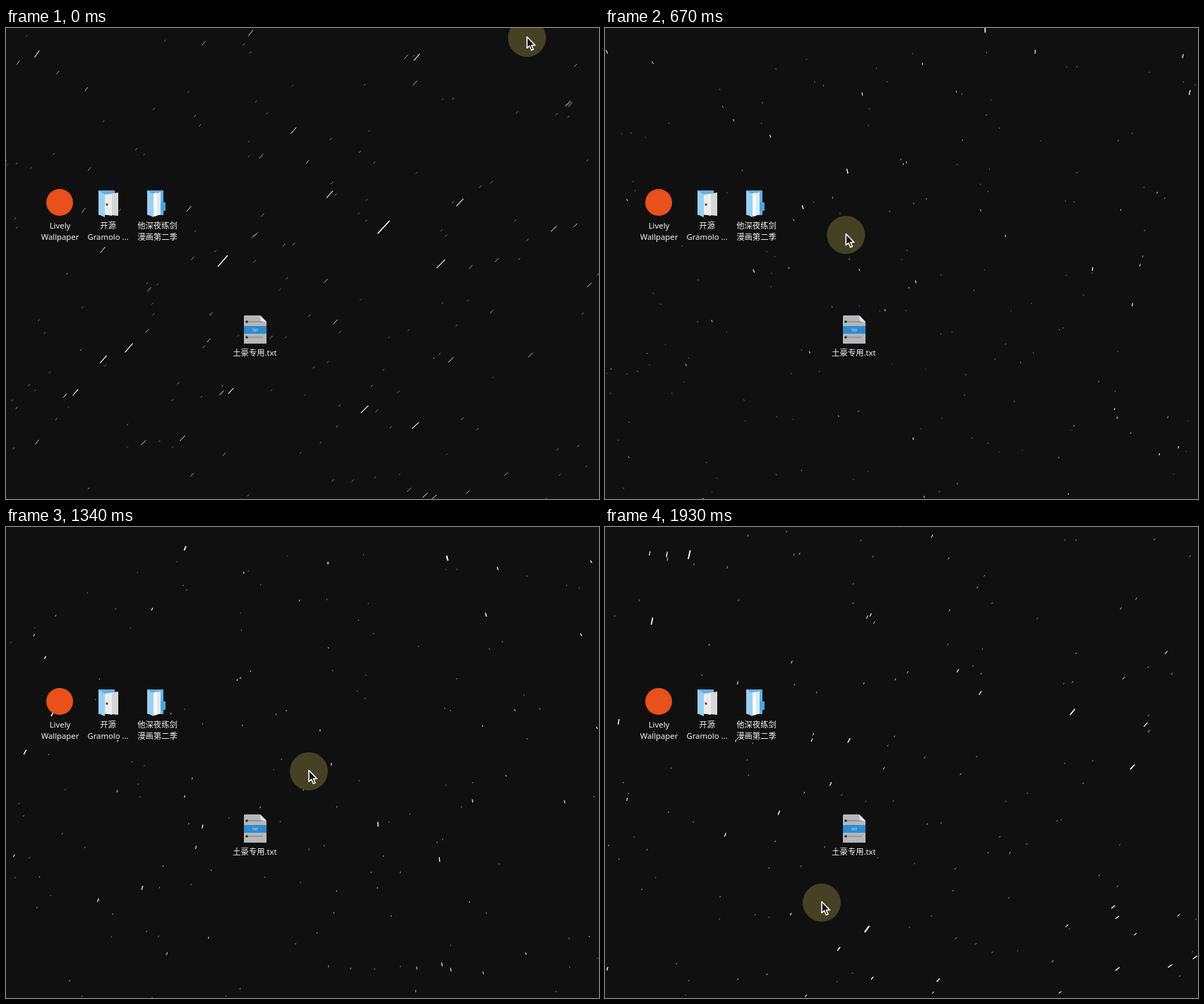
Animation, 840 px wide and 667 px high, one loop 2060 ms. Source, as an HTML page with a canvas:

```html
<!DOCTYPE html>
<html lang="zh">
<head>
<meta charset="utf-8">
<style>
html, body { margin: 0; width: 840px; height: 667px; overflow: hidden; background: #101010; }
canvas { display: block; }
</style>
</head>
<body>
<canvas id="stage" width="840" height="667"></canvas>
<script>
const W = 840, H = 667, LOOP = 2060, STEP = 10, MARGIN = 60;
const ZOOM = 0.0003, GROWTH = 0.00033; // per ms
const g = document.getElementById('stage').getContext('2d');

// the picture holds for short or long beats
const holds = [0];
for (const beat of 'SLLLSSLSSSLSLSLLLLS') holds.push(holds.at(-1) + (beat === 'S' ? 70 : 130));

// time, pointer x y, star drift x y, drift velocity x y
const keys = [
  [0, 738, 14, 0, 0, .75, -.82],
  [330, 492, 195, 201, -225, .5, -.6],
  [530, 367, 267, 252, -310, .13, -.32],
  [870, 291, 378, 189, -365, -.3, 0],
  [1340, 429, 346, 9, -244, 0, .25],
  [1600, 511, 130, -4, -247, -.08, -.25],
  [1930, 307, 532, 113, -404, .15, -.27]
];

function slope(i, col) {
  const a = keys[Math.max(i - 1, 0)], b = keys[Math.min(i + 1, keys.length - 1)];
  return (b[col] - a[col]) / (b[0] - a[0]);
}

// cubic Hermite curve through one column of the keys
function curve(t, col) {
  const last = keys.at(-1);
  if (t >= last[0]) return last[col];
  const i = keys.findIndex(k => k[0] > t) - 1;
  const a = keys[i], b = keys[i + 1], d = b[0] - a[0], u = (t - a[0]) / d;
  const va = col > 2 ? a[col + 2] : slope(i, col);
  const vb = col > 2 ? b[col + 2] : slope(i + 1, col);
  const s = u * u * (3 - 2 * u);
  return a[col] + (b[col] - a[col]) * s + d * u * (1 - u) * (va * (1 - u) - vb * u);
}

// star drift per time step
const drift = [];
for (let t = 0; t <= LOOP; t += STEP) {
  drift.push([3, 4].map(col => curve(t + STEP, col) - curve(t, col)));
}

let seed = 20;
function random() {
  seed = (seed * 16807) % 2147483647;
  return seed / 2147483647;
}

// x, y, depth: the nearest stars, then a random field
const stars = [
  [535, 282, .95], [307, 330, .83], [616, 334, .63], [174, 453, .69],
  [138, 469, .605], [508, 540, .585], [580, 563, .515], [643, 247, .52]
];
while (stars.length < 260) {
  stars.push([
    random() * (W + 2 * MARGIN) - MARGIN,
    random() * (H + 2 * MARGIN) - MARGIN,
    .11 + .4 * random() ** 4
  ]);
}

function wrap(v, size) {
  const span = size + 2 * MARGIN;
  return ((v + MARGIN) % span + span) % span - MARGIN;
}

function drawStar([x, y, z], t) {
  const move = ([dx, dy]) => [
    z * (dx + (x - W / 2) * ZOOM * STEP),
    z * (dy + (y - H / 2) * ZOOM * STEP)
  ];
  const n = Math.round(t / STEP);
  for (let i = 0; i < n; i++) {
    const [dx, dy] = move(drift[i]);
    x = wrap(x + dx, W);
    y = wrap(y + dy, H);
    z *= 1 + GROWTH * STEP;
  }
  let [tx, ty] = move(drift[Math.max(n - 1, 0)]).map(v => v * 1.1);
  if (Math.hypot(tx, ty) < .3) tx = ty = .25;
  g.lineWidth = .55 + z;
  g.globalAlpha = Math.min(1, .35 + .3 * random() + 1.1 * z);
  g.beginPath();
  g.moveTo(x - tx, y - ty);
  g.lineTo(x + tx, y + ty);
  g.stroke();
}

function shape(color, ...p) {
  g.fillStyle = color;
  g.beginPath();
  for (let i = 0; i < p.length; i += 2) g.lineTo(p[i], p[i + 1]);
  g.closePath();
  g.fill();
}

function box(color, x, y, w, h) {
  g.fillStyle = color;
  g.fillRect(x, y, w, h);
}

function disc(color, x, y, r) {
  g.fillStyle = color;
  g.beginPath();
  g.arc(x, y, r, 0, 7);
  g.fill();
}

function label(x, y, ...lines) {
  g.font = '11.3px "Noto Sans", "Noto Sans CJK SC", "Noto Sans CJK", sans-serif';
  g.textAlign = 'center';
  g.fillStyle = '#f4f4f4';
  lines.forEach((line, i) => g.fillText(line, x, y + 16 * i));
}

// blue back and cover; the pages go between
function folder(x, pages) {
  box('#5db0e6', x, 230, 23, 35);
  pages();
  shape('#9bd0f2', x, 230, x + 9, 236, x + 9, 268, x, 264);
}

function drawIcons() {
  disc('#e8501c', 76, 247, 19);
  label(76.5, 284, 'Lively', 'Wallpaper');

  folder(131, () => {
    shape('#d6d6d6', 138, 236, 159, 233, 159, 266, 138, 264);
    shape('#ececec', 140, 237, 150, 235, 150, 266, 140, 264);
  });
  disc('#5a4640', 143, 250, 1.7);
  label(144.5, 284, '开源', 'Gramolo ...');

  folder(200, () => {
    box('#4ba3dd', 219, 247, 7, 12);
    shape('#dfeaf1', 210, 236, 219, 232, 219, 264, 210, 267);
    shape('#f6fafc', 207, 235, 214, 233, 214, 266, 207, 267);
  });
  label(214.5, 284, '他深夜练剑', '漫画第二季');

  shape('#b5b7b9', 338, 407, 360, 407, 369, 416, 369, 447, 337, 447, 337, 408);
  shape('#e6e8ea', 360, 407, 369, 416, 361, 416);
  for (const y of [416, 438]) {
    box('#77797b', 341, y - .5, 23, 1);
    disc('#222', 341, y, 1.7);
  }
  box('#2f8ccf', 337, 422, 32, 11);
  label(352.5, 464, '土豪专用.txt');
  g.font = '5px "Noto Sans", sans-serif';
  g.fillText('TXT', 353, 429.5);
}

function drawPointer(t) {
  const x = curve(t, 1), y = curve(t, 2);
  disc('rgba(255,235,110,.22)', x, y, 27);
  g.save();
  g.translate(x, y - 1.5);
  shape('#151515', 0, 0, 0, 16, 3.6, 12.8, 6.3, 19, 9, 17.8, 6.5, 12, 11.5, 12);
  g.lineWidth = 1.6;
  g.lineJoin = 'round';
  g.stroke();
  g.restore();
}

function draw(t) {
  seed = 77;
  g.globalAlpha = 1;
  box('#101010', 0, 0, W, H);
  g.strokeStyle = '#fff';
  g.lineCap = 'round';
  stars.forEach(s => drawStar(s, t));
  g.globalAlpha = 1;
  drawIcons();
  drawPointer(t);
}

let shown = -1;
function tick() {
  const now = performance.now() % LOOP;
  const t = holds.filter(h => h <= now).pop();
  if (t !== shown) draw(shown = t);
  requestAnimationFrame(tick);
}
tick();
</script>
</body>
</html>
```
